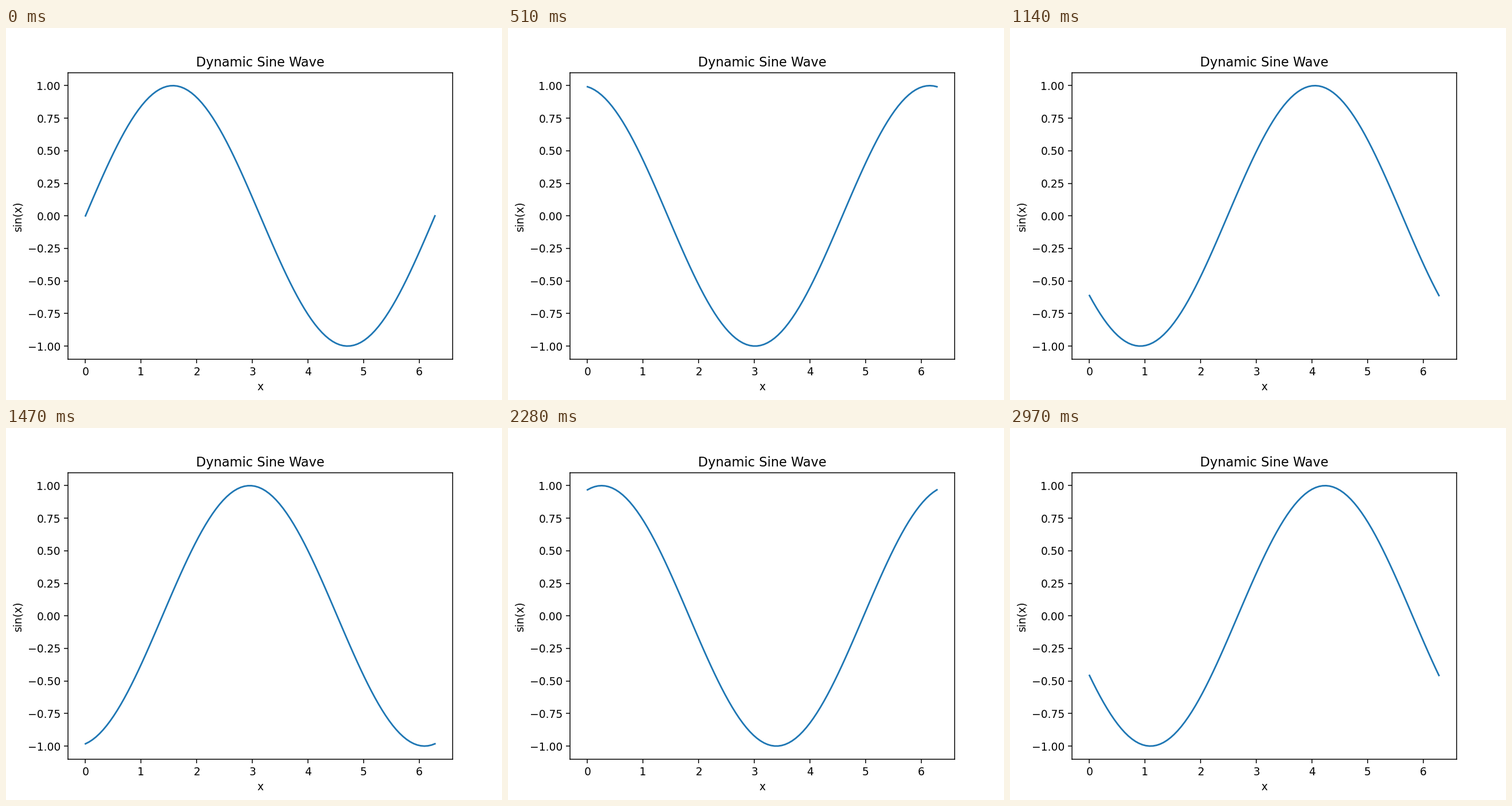
Animation, 864 px wide and 648 px high, one loop 3000 ms. Source, as a matplotlib script:

```python
import numpy as np
import matplotlib.pyplot as plt
from matplotlib.animation import FuncAnimation

FRAMES = 100
INTERVAL = 30  # ms
PHASE_STEP = 0.1  # radians per frame

x = np.linspace(0, 2 * np.pi, 100)

fig, ax = plt.subplots(figsize=(6.4, 4.8), dpi=135)
line, = ax.plot(x, np.sin(x))
ax.set_title("Dynamic Sine Wave")
ax.set_xlabel("x")
ax.set_ylabel("sin(x)")


def update(i):
    line.set_ydata(np.sin(x + i * PHASE_STEP))
    return line,


anim = FuncAnimation(fig, update, frames=FRAMES, interval=INTERVAL,
                     repeat=True, repeat_delay=0)
plt.show()
```
